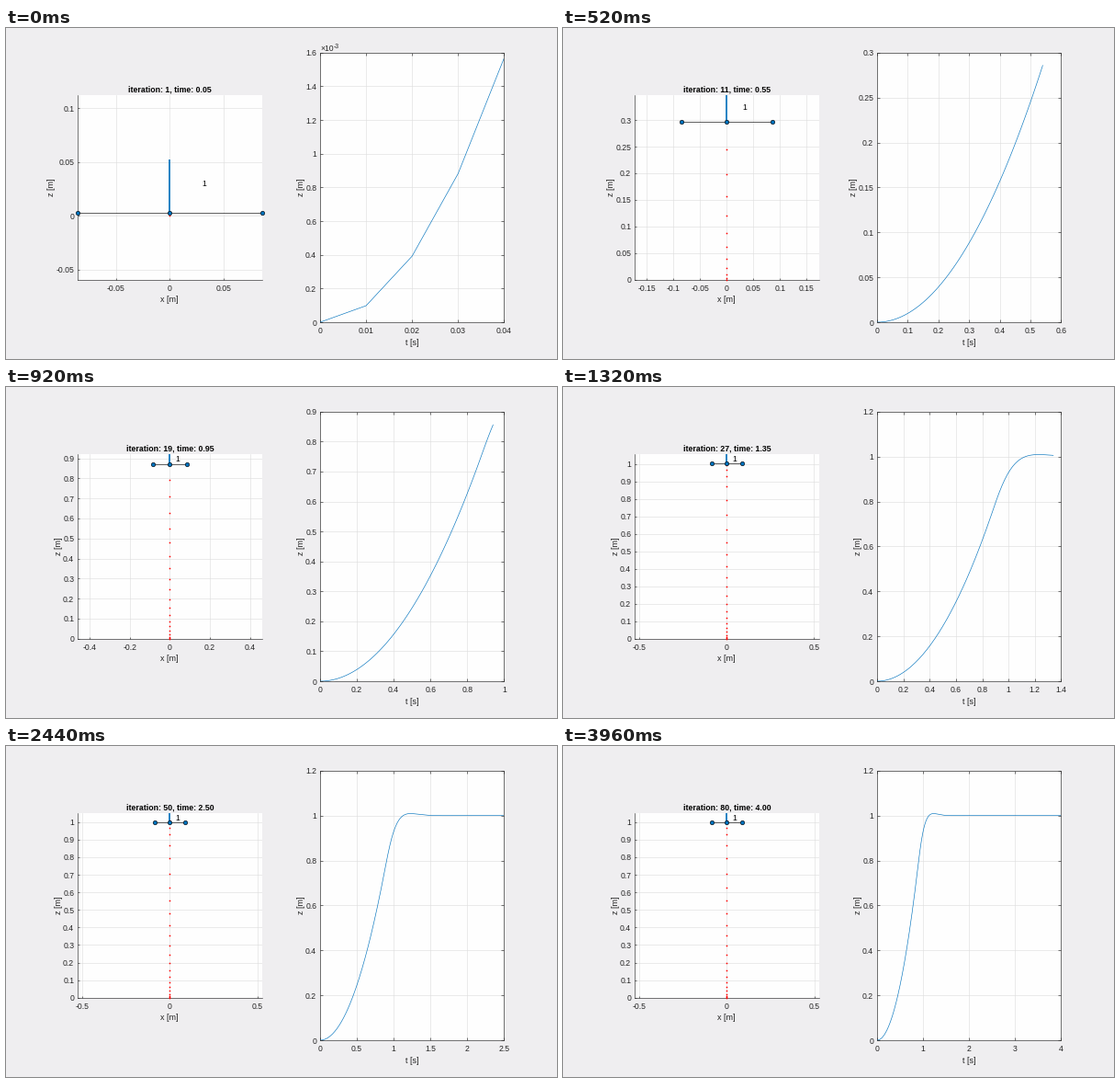
These frames come from a looping animation (600 by 360 pixels, 4 s). A matplotlib script:

```python
import math

import matplotlib.pyplot as plt
import numpy as np
from matplotlib.animation import FuncAnimation

W, H, DPI = 600, 360, 100
BLUE, INK, GRID = "#0072bd", "#262626", "#dedede"
FRAMES, INTERVAL = 100, 40
TEXT, LABEL, TITLE, HAIR = 8.6, 9.0, 8.8, 0.62  # sizes in pixels
ARM, MAST = 0.0859, 0.05

# Flight model: full thrust until BRAKE, then a damped approach to 1 m
ACCEL, BRAKE, DECAY, OMEGA = 1.96, 0.87, 8.25, 6.97


def px(n):
    """Pixels to points."""
    return n * 72 / DPI


def height(t):
    t = np.asarray(t, float)
    gap = ACCEL * BRAKE**2 / 2 - 1
    swing = (ACCEL * BRAKE + DECAY * gap) / OMEGA
    s = np.maximum(t - BRAKE, 0)
    settle = 1 + np.exp(-DECAY * s) * (gap * np.cos(OMEGA * s) + swing * np.sin(OMEGA * s))
    return np.where(t < BRAKE, ACCEL * t**2 / 2, settle)


def nice_step(top, most):
    """Smallest 1-2-5 step that needs at most the given number of intervals."""
    for power in range(-5, 2):
        for lead in (1, 2, 5):
            step = lead * 10.0**power
            if math.ceil(top / step - 1e-9) <= most:
                return step


def tick_values(lo, hi, step):
    first = math.ceil(lo / step - 1e-9)
    last = math.floor(hi / step + 1e-9)
    return [i * step for i in range(first, last + 1)]


def set_axis(axis, lo, hi, step, unit=1):
    values = tick_values(lo, hi, step)
    axis.set_ticks(values, [f"{v / unit:g}" for v in values])
    axis.axes.set(**{f"{axis.axis_name}lim": (lo, hi)})


def make_axes(left, top, right, bottom, tick, xlabel, boxed):
    ax = fig.add_axes([left / W, 1 - bottom / H, (right - left) / W, (bottom - top) / H])
    ax.set_facecolor("#fefefe")
    ax.set_axisbelow(True)
    ax.grid(color=GRID, linewidth=px(HAIR))
    for side, spine in ax.spines.items():
        spine.set(color=INK, linewidth=px(HAIR))
        spine.set_visible(boxed or side in ("left", "bottom"))
    ax.tick_params(direction="in", length=px(tick), width=px(HAIR), color=INK,
                   labelcolor=INK, labelsize=px(TEXT), top=boxed, right=boxed)
    ax.tick_params(axis="x", pad=px(5.5))
    ax.tick_params(axis="y", pad=px(3.8))
    ax.set_xlabel(xlabel, fontsize=px(LABEL), color=INK, labelpad=px(3.2))
    ax.set_ylabel("z [m]", fontsize=px(LABEL), color=INK, labelpad=0)
    return ax


def stage_text(x, y, text, size, **style):
    return fig.text(x / W, 1 - y / H, text, fontsize=px(size), va="baseline", **style)


plt.rcParams["font.family"] = "Liberation Sans"
fig = plt.figure(figsize=(W / DPI, H / DPI), dpi=DPI, facecolor="#efeef0")

scene = make_axes(78, 73.2, 278.6, 273.8, 2, "x [m]", boxed=False)
graph = make_axes(342, 26.8, 542.4, 320, 2.9, "t [s]", boxed=True)

title = stage_text(178.5, 69.8, "", TITLE, ha="center", weight="bold", color="black")
exponent = [stage_text(342.5, 25.3, "×10", TEXT, color=INK),
            stage_text(357.2, 21.5, "-3", 6.8, color=INK)]

trail, = scene.plot([], [], "o", color="red", ms=px(1.7), mew=0, clip_on=False, zorder=3)
beam, = scene.plot([], [], color="#202020", lw=px(0.7), zorder=4)
mast, = scene.plot([], [], color=BLUE, lw=px(1.7), solid_capstyle="butt", zorder=5)
hubs, = scene.plot([], [], "o", color=BLUE, ms=px(4.4), mec="#101820", mew=px(0.7),
                   clip_on=False, zorder=6)
tag = scene.text(0.03, 0, "1", fontsize=px(TEXT), va="center_baseline", color="black", zorder=7)
curve, = graph.plot([], [], color=BLUE, lw=px(HAIR), zorder=3)


def draw_scene(step):
    z = float(height(step * 0.05))
    past = height(np.arange(step) * 0.05)
    trail.set_data(np.zeros(step), past)
    beam.set_data([-ARM, ARM], [z, z])
    mast.set_data([0, 0], [z, z + MAST])
    hubs.set_data([-ARM, 0, ARM], [z, z, z])
    tag.set_y(z + 0.028)

    top = z + MAST
    span = max(2 * ARM, top)
    x_step = 0.05 if span <= 0.35 else 0.1 if span <= 0.7 else 0.2 if span < 1 else 0.5
    y_step = 0.05 if span < 0.5 else 0.1
    set_axis(scene.xaxis, -span / 2, span / 2, x_step)
    set_axis(scene.yaxis, (top - span) / 2, (top + span) / 2, y_step)


def draw_graph(step):
    t = np.arange(5 * step) * 0.01
    z = height(t)
    curve.set_data(t, z)
    for axis, top, most in ((graph.xaxis, t[-1], 7), (graph.yaxis, z.max(), 10)):
        gap = nice_step(top, most)
        limit = math.ceil(top / gap - 1e-9) * gap
        small = limit < 0.0099
        set_axis(axis, 0, limit, gap, 1e-3 if small else 1)
    for part in exponent:
        part.set_visible(small)


def update(frame):
    # 80 simulation steps spread over 100 frames
    step = 1 + int(0.8 * frame + 0.3)
    title.set_text(f"iteration: {step}, time: {step * 0.05:.2f}")
    draw_scene(step)
    draw_graph(step)
    return []


anim = FuncAnimation(fig, update, frames=FRAMES, interval=INTERVAL,
                     init_func=lambda: [], repeat=True, repeat_delay=0)
plt.show()
```
